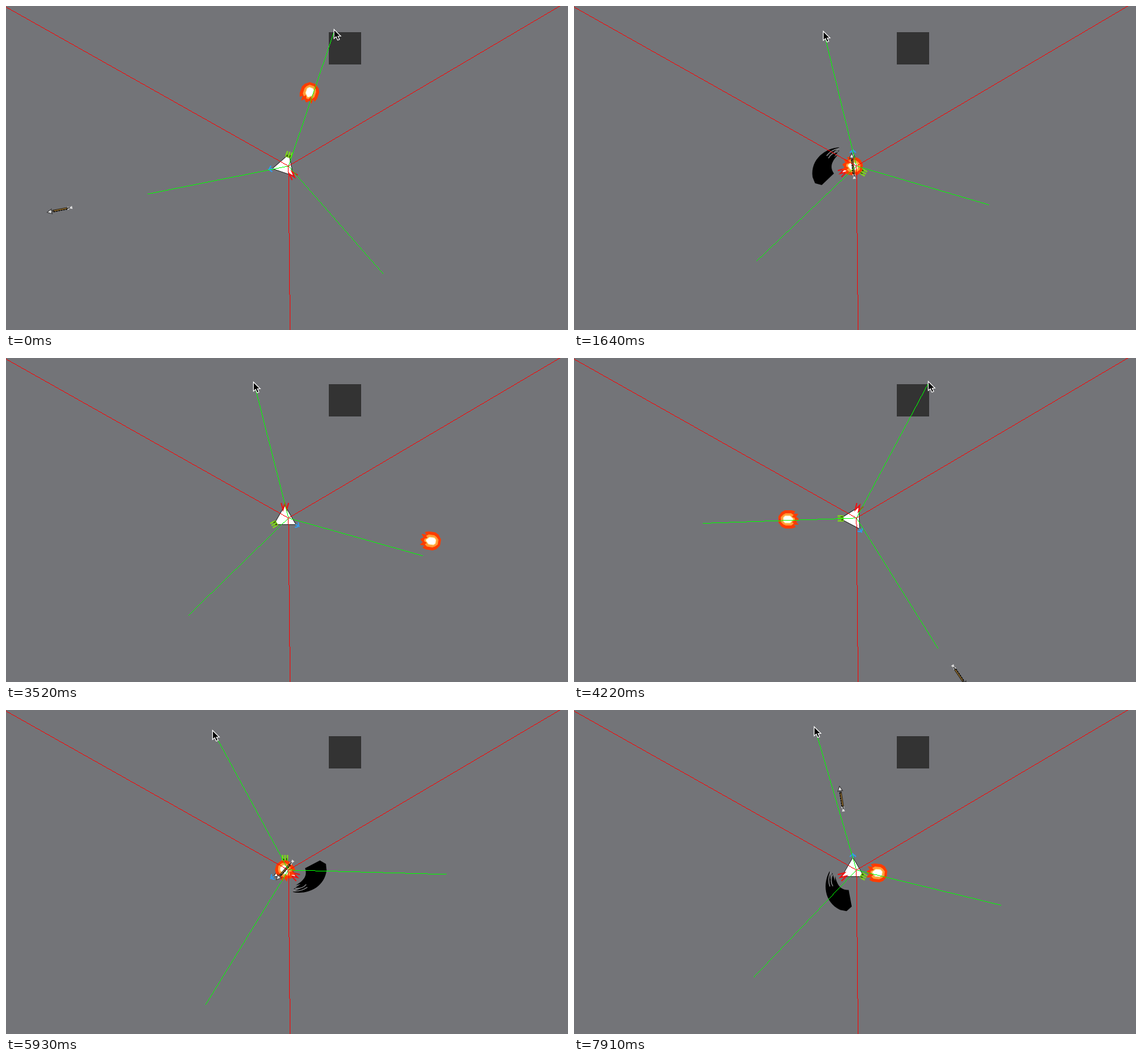
An HTML page with a canvas that plays this animation: 921 by 532 pixels, repeating every 7.99 s.

```html
<!DOCTYPE html>
<html lang="en">
<head>
<meta charset="utf-8">
<title>Rotating weapons</title>
<style>
html, body { margin: 0; width: 100%; height: 100%; overflow: hidden; background: #737478; }
canvas { display: block; }
</style>
</head>
<body>
<canvas id="stage" width="921" height="532"></canvas>
<script>
const ctx = document.getElementById('stage').getContext('2d');
const RAD = Math.PI / 180;
const HUB = { x: 462.4, y: 262.3 }, BODY = { x: 457, y: 263 };

// The screen is refreshed about every 80 ms between these moments.
const beats = [0, 60, 1640, 2430, 3520, 4750, 5930, 7910, 7990];
const LOOP = beats[beats.length - 1], REFRESH = 80;

// The pointer sweeps to each place (start time, x, y) and rests there.
const home = [537, 38], SWEEP = 360;
const sweeps = [
  [150, 408, 41], [1740, 549, 38], [2480, 405, 39], [3560, 580, 38],
  [4567, 405, 32], [5080, 338, 33], [6000, 574, 32], [6740, 393, 27]
];
const LINE_LAG = 70, BODY_LAG = 200;

// Every so often the weapons move on by one corner.
const SWITCH = { first: 1190, every: 2040, time: 150 };

// Launch time; optional lead by which the claw strikes before the shots
const volleys = [
  [-255], [440], [1640], [2430, 44], [3049], [3962], [4540], [5930, 70], [6700], [7020], [7820]
];
const FIRE_SPEED = 0.53, ARROW_SPEED = 1.56, START_LAG = 14;
const CLAW_START = 28, CLAW_TURN = -0.633, CLAW_LIFE = 160;

function ease(u) {
  u = Math.min(1, Math.max(0, u));
  return u * u * (3 - 2 * u);
}

function refreshed(clock) {
  const i = beats.findIndex((b, k) => clock < beats[k + 1]);
  const span = beats[i + 1] - beats[i], step = span / Math.round(span / REFRESH);
  return beats[i] + Math.floor((clock - beats[i]) / step + 0.01) * step;
}

function pointerAt(t) {
  let [x, y] = home;
  sweeps.forEach(([start, u, v]) => {
    const e = ease((t - start) / SWEEP);
    x += (u - x) * e;
    y += (v - y) * e;
  });
  return { x, y };
}

function aimVector(t) {
  const p = pointerAt(t);
  return { x: p.x + 1 - HUB.x, y: p.y + 1.5 - HUB.y };
}

function aimAngle(t) {
  const a = aimVector(t);
  return Math.atan2(a.y, a.x) / RAD;
}

// Turn of the blue corner away from the aim
function cornerTurn(t) {
  let steps = 2;
  for (let at = SWITCH.first; at < t; at += SWITCH.every) steps += ease((t - at) / SWITCH.time);
  return 120 * steps;
}

function bodyAngle(t) {
  return Math.max(-90, aimAngle(t - BODY_LAG)) + cornerTurn(t);
}

function shape(points, fill, stroke) {
  ctx.beginPath();
  points.forEach(([x, y]) => ctx.lineTo(x, y));
  if (fill) { ctx.closePath(); ctx.fillStyle = fill; ctx.fill(); }
  if (stroke) { ctx.strokeStyle = stroke; ctx.stroke(); }
}

function rect(x, y, w, h, color) {
  ctx.fillStyle = color;
  ctx.fillRect(x, y, w, h);
}

function placed(x, y, deg, draw) {
  ctx.save();
  ctx.translate(x, y);
  ctx.rotate(deg * RAD);
  draw();
  ctx.restore();
}

// One pixel wide, without smoothing
function ray(dx, dy, color) {
  const n = Math.max(Math.abs(dx), Math.abs(dy));
  const snap = Math.abs(dx) > Math.abs(dy)
    ? (Math.round(HUB.x) - HUB.x) * Math.sign(dx)
    : (Math.round(HUB.y) - HUB.y) * Math.sign(dy);
  for (let i = snap; i <= n; i++) {
    rect(Math.round(HUB.x + dx * i / n), Math.round(HUB.y + dy * i / n), 1, 1, color);
  }
}

function mirrored(half) {
  return half.concat(half.slice().reverse().map(([x, y]) => [x, -y]));
}
const flame = mirrored([[16, 5], [11, 12], [5, 15], [-6, 15], [-12, 13], [-9, 9], [-17, 9], [-13, 4], [-17, 1]]);
const ember = mirrored([[12, 4], [8, 8], [4, 10], [-5, 10], [-9, 7], [-6, 4], [-11, 2]]);
const core = mirrored([[8, 3], [5, 6], [-3, 6], [-6, 3], [-8, 1]]);

function drawFire() {
  shape(flame, '#ff3c00');
  shape(ember, '#ff9c38');
  shape(core, '#fff', '#ffe08a');
}

function drawArrow() {
  rect(-14, -1.5, 26, 3.5, '#2a2216');
  rect(-12, -0.5, 22, 1.5, '#96702e');
  for (let x = -12; x < 11; x += 4) rect(x, -2, 2, 1.5, '#000');
  shape([[21, 0], [13, -4], [14, -1], [10, 0], [14, 1], [13, 4]], '#e8e8e8', '#333');
  shape([[-21, -2.5], [-17, -1], [-13, -2.5], [-13, 2.5], [-17, 1], [-21, 2.5]], '#ddd');
  rect(-17, -0.5, 5, 1.5, '#222');
}

// Drawn as it lies when it points at 178 degrees
function drawClaw() {
  ctx.rotate(-178 * RAD);
  ctx.beginPath();
  ctx.moveTo(-22, -31);
  ctx.bezierCurveTo(-44, -30, -70, -12, -66, 18);
  ctx.lineTo(-62, 28);
  ctx.lineTo(-51, 31);
  ctx.lineTo(-31, 12);
  ctx.bezierCurveTo(-37, 3, -37, -6, -24, -19);
  ctx.lineTo(-31, -15);
  ctx.lineTo(-22, -26);
  ctx.lineTo(-33, -22);
  ctx.closePath();
  ctx.fillStyle = '#000';
  ctx.fill();
  ctx.lineWidth = 1.4;
  ctx.strokeStyle = '#8a8b8e';
  for (const k of [0, 1]) {
    ctx.beginPath();
    ctx.moveTo(-23 - k, -29 + 5 * k);
    ctx.quadraticCurveTo(-35 - k, -27 + 5 * k, -43 + 3 * k, -17 + 4 * k);
    ctx.stroke();
  }
}

function drawBody(deg) {
  placed(BODY.x, BODY.y, deg, () => {
    const corner = k => [21 * Math.cos(k * 120 * RAD), 21 * Math.sin(k * 120 * RAD)];
    shape([0, 1, 2, 3].map(corner), '#fff', '#222');
    ctx.lineWidth = 2;
    // bow
    shape([[22, -5], [25, -2], [25, 2], [22, 5]], null, '#2f9cf0');
    shape([[20, 0], [28, 0]], null, '#2f9cf0');
    // dragon head
    ctx.rotate(120 * RAD);
    rect(15, -5, 5, 10, '#76c81c');
    for (let y = -5; y < 5; y += 4) rect(18, y, 7, 2.5, '#7fd41e');
    rect(16, -3, 3, 2, '#33440e');
    rect(16, 2, 4, 1.5, '#33440e');
    // claws
    ctx.rotate(120 * RAD);
    shape([[25, -6], [14, -3], [24, 0], [14, 3], [25, 6]], null, '#f01010');
  });
}

function drawShot(deg, dist, draw) {
  const c = Math.cos(deg * RAD), s = Math.sin(deg * RAD);
  const hitsBox = s < 0 && c > 0.3 && c < 0.54;
  if (dist < (hitsBox ? 172 : 620)) placed(BODY.x + dist * c, BODY.y + dist * s, deg, draw);
}

function drawVolley([at, lead = 0], t) {
  const strike = t - at + lead;
  if (t < at) return;
  if (strike < CLAW_LIFE) {
    placed(BODY.x, BODY.y, bodyAngle(at) + 240 + CLAW_START + CLAW_TURN * strike, drawClaw);
  }
  const aim = aimAngle(at - LINE_LAG), blue = aim + cornerTurn(at);
  const spread = (-70 - aim) * 0.2, age = Math.max(0, t - at - START_LAG);
  drawShot(blue + 120 - spread, age * FIRE_SPEED, drawFire);
  drawShot(blue + spread, age * ARROW_SPEED, drawArrow);
}

function drawLines(t) {
  const a = aimVector(t - LINE_LAG);
  for (let k = 0; k < 3; k++) {
    const c = Math.cos(120 * k * RAD), s = Math.sin(120 * k * RAD);
    ray(a.x * c - a.y * s, a.x * s + a.y * c, '#0f0');
  }
  // sector borders
  for (let k = 0; k < 3; k++) {
    const turn = (89.43 + 120 * k) * RAD;
    ray(600 * Math.cos(turn), 600 * Math.sin(turn), '#f00');
  }
}

function drawPointer(t) {
  const { x, y } = pointerAt(t);
  placed(Math.round(x) + 0.5, Math.round(y) + 0.5, 0, () => {
    ctx.lineWidth = 1.2;
    shape([[0, 0], [0, 15], [3.5, 12], [6, 17.5], [9, 16.5], [6.5, 11], [11, 11], [0, 0]], '#000', '#fff');
  });
}

function draw(now) {
  const t = refreshed(now % LOOP);
  rect(0, 0, 921, 532, '#737478');
  rect(529, 43, 53, 53, '#333');
  drawBody(bodyAngle(t));
  volleys.forEach(v => drawVolley(v, t));
  drawLines(t);
  drawPointer(t);
}

let began = null;
function loop(now) {
  if (began === null) began = now;
  draw(now - began);
  requestAnimationFrame(loop);
}
draw(0);
requestAnimationFrame(loop);
</script>
</body>
</html>
```
